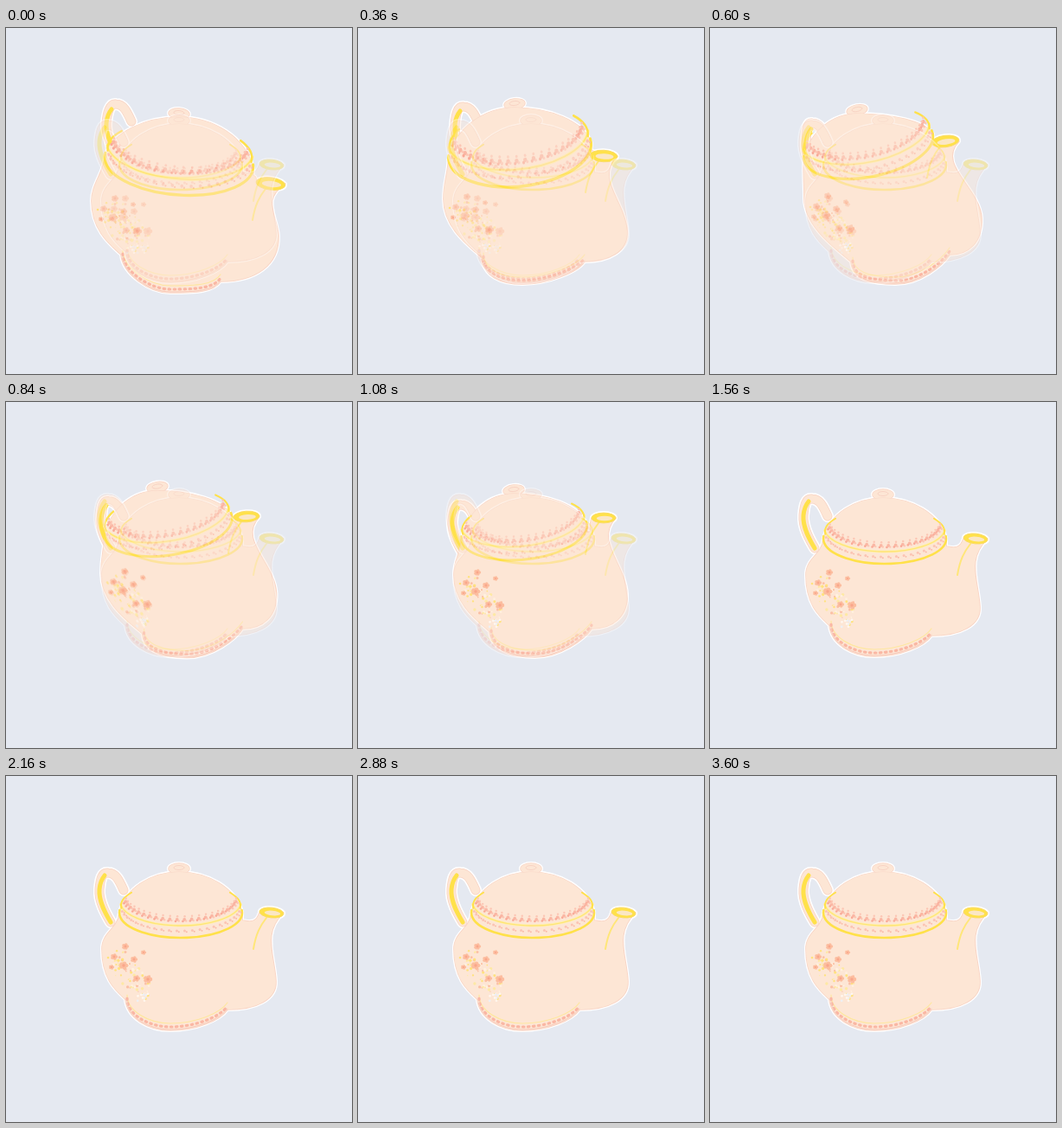
Animation of 400 by 400 pixels, one loop 3.72 s. Source, as an HTML page with a canvas:

```html
<!DOCTYPE html>
<html lang="en">
<head>
<meta charset="utf-8">
<title>Wobbling teapot</title>
<style>
html, body { margin: 0; width: 100%; height: 100%; overflow: hidden; background: #e5e9f1; }
canvas { position: absolute; left: 0; top: 0; }
#ghost { opacity: .4; }
</style>
</head>
<body>
<canvas id="pot" width="400" height="400"></canvas>
<canvas id="ghost" width="400" height="400"></canvas>
<script>
const FILL = '#fde6d5', EDGE = '#f8d3c4', YELLOW = '#ffe14a', PINK = '#fab7a4';
const STEP = 120, LOOP = 3720;

// rim x y rx ry turn | knob | handle top, left | mouth x y rx turn | body left | base left, bottom, right | bulge
const rest = [202,158,71,29,0, 200,105, 118,107, 103,131, 307,158,14,.1, 111,200, 138,258, 190,294, 256,270, 312,237];
const lean = [200,155,86,38,.08, 200,97, 127,83, 111,110, 306,180,17,.12, 99,200, 133,262, 190,306, 248,293, 315,240];
const rise = [187,142,83,41,-.12, 181,86, 122,86, 107,112, 284,148,16,.05, 99,198, 143,265, 190,296, 262,270, 311,235];
const back = [183,137,76,35,-.2, 170,93, 118,105, 106,133, 272,131,16,-.12, 109,197, 163,270, 214,296, 277,262, 314,220];
const fall = [192,150,73,32,-.12, 180,100, 119,114, 104,138, 284,134,14,0, 111,200, 152,265, 204,295, 270,262, 311,222];

const mix = (a, b, k) => a.map((v, i) => v + (b[i] - v) * k);
const keys = [[0, lean], [120, mix(rest, lean, 1.2)], [360, rise], [600, back], [1080, fall], [1440, rest]];

function poseAt(t) {
  const i = keys.findIndex(k => k[0] > t);
  if (i < 0) return rest;
  const [t0, a] = keys[i - 1], [t1, b] = keys[i];
  return mix(a, b, (t - t0) / (t1 - t0));
}

function seeded(seed) {
  return () => (seed = seed * 16807 % 2147483647) / 2147483647;
}

function draw(c, p) {
  const [rx, ry, rw, rh, turn, kx, ky, tx, ty, hx, hy, mx, my, mw, mturn,
    lx, ly, ax, ay, bx, by, ex, ey, ux, uy] = p;
  const dx = rw * Math.cos(turn), dy = rw * Math.sin(turn);
  const left = [rx - dx, ry - dy], right = [rx + dx, ry + dy];

  const stroke = (path, color, width) => {
    c.strokeStyle = color; c.lineWidth = width; c.stroke(path);
  };
  const fill = (path, color) => { c.fillStyle = color; c.fill(path); };
  const dot = (x, y, r, color) => {
    c.fillStyle = color; c.beginPath(); c.arc(x, y, r, 0, 7); c.fill();
  };
  const oval = (x, y, w, h, a = 0, from = 0, to = 2 * Math.PI) => {
    const path = new Path2D();
    path.ellipse(x, y, w, h, a, from, to);
    return path;
  };
  const baseCurve = (path, up) => {
    path.bezierCurveTo(ax + 2, ay + 22 - up, bx - 25, by - up, bx, by - up);
    path.bezierCurveTo(bx + 30, by - up, ex - 8, ey + 12 - up, ex, ey - up);
  };

  const handle = new Path2D();
  handle.moveTo(hx + 18, hy + 38);
  handle.bezierCurveTo(hx + 12, hy + 28, hx + 4, hy + 14, hx + 5, hy);
  const grip = new Path2D(handle);
  handle.bezierCurveTo(hx + 6, hy - 12, tx - 7, ty + 4, tx, ty + 5);
  handle.bezierCurveTo(tx + 9, ty + 5, tx + 13, ty + 14, tx + 18, ty + 25);
  grip.quadraticCurveTo(hx + 6, hy - 10, hx + 11, hy - 16);

  const body = new Path2D();
  body.moveTo(...left);
  body.bezierCurveTo(left[0] - 1, left[1] + 19, lx, ly - 20, lx, ly);
  body.bezierCurveTo(lx, ly + 34, ax - 12, ay - 11, ax, ay);
  baseCurve(body, 0);
  body.bezierCurveTo(ex + .6 * (ux - ex), ey, ux + 1, uy + .65 * (ey - uy), ux, uy);
  body.bezierCurveTo(ux - 2, uy - .4 * (uy - my), mx - 11, my + .3 * (uy - my), mx + mw, my);
  body.lineTo(mx - mw, my);
  body.bezierCurveTo(mx - mw - 4, my + 13, right[0] + 8, right[1] + 10, right[0], right[1] + 9);
  body.lineTo(...right);
  body.closePath();

  const lid = new Path2D(), top = ky + 6, lw = kx - left[0], rlen = right[0] - kx;
  lid.moveTo(...left);
  lid.bezierCurveTo(left[0] + .1 * lw, left[1] + .62 * (top - left[1]), kx - .45 * lw, top, kx, top);
  lid.bezierCurveTo(kx + .45 * rlen, top, right[0] - .1 * rlen, right[1] + .62 * (top - right[1]), ...right);
  lid.addPath(oval(rx, ry, rw, rh, turn, 0, Math.PI));

  const knob = oval(kx, ky + 2, 12, 6, turn);
  const mouth = oval(mx, my, mw, mw * .42, mturn);

  c.clearRect(0, 0, 400, 400);
  c.lineCap = c.lineJoin = 'round';
  stroke(handle, '#fff', 14);
  for (const part of [body, lid, knob, mouth]) stroke(part, '#fff', 4);
  stroke(handle, EDGE, 11);
  stroke(handle, FILL, 9.5);
  stroke(grip, YELLOW, 5);

  stroke(body, EDGE, 1.6);
  fill(body, FILL);
  stroke(knob, EDGE, 1.4);
  fill(knob, FILL);
  stroke(lid, EDGE, 1.2);
  fill(lid, FILL);
  stroke(oval(kx, ky + 1, 6, 2.5, turn), EDGE, 1);

  // foot border
  const foot = up => {
    const path = new Path2D();
    path.moveTo(ax + 2, ay - up + 3);
    baseCurve(path, up);
    return path;
  };
  stroke(foot(8), '#fee7a0', 1.2);
  c.setLineDash([1.5, 4.5]);
  stroke(foot(4), PINK, 3.2);
  c.setLineDash([]);
  stroke(foot(1), '#f9c9ba', 1);

  // rim and lid borders
  c.save();
  c.translate(rx, ry);
  c.rotate(turn);
  c.scale(rw / 71, rh / 29);
  stroke(oval(0, -13, 70, 28, 0, .12, Math.PI - .12), '#fff0b0', 3);
  stroke(oval(0, -13, 70, 28, 0, .12, Math.PI - .12), '#ffe477', 1.3);
  stroke(oval(0, 0, 71, 29, 0, -.1, Math.PI + .1), YELLOW, 2.6);
  stroke(oval(0, -8, 69, 27, 0, -.6, .1), YELLOW, 2);
  stroke(oval(0, -8, 69, 27, 0, Math.PI - .1, Math.PI + .6), YELLOW, 2);
  for (let i = 0; i < 22; i++) {
    const a = .2 + i * (Math.PI - .4) / 21, x = Math.cos(a), y = Math.sin(a);
    const px = 65 * x, py = 26 * y - 19;
    dot(px, py + 1, 1.9, PINK);
    dot(px - 1.8, py + 3, 1.3, '#f9a997');
    dot(px + 2, py + 2.6, 1.2, '#fcc6b4');
    dot(px + .4, py - 2.7, 1.2, '#fcc6b4');
    dot(69 * x, 28 * y - 7, 1.5, '#fbc4b3');
    dot(69 * x + 2.4, 28 * y - 5.7, .9, PINK);
  }
  c.restore();

  // spout
  const streak = new Path2D();
  streak.moveTo(mx - 6, my + 6);
  streak.bezierCurveTo(mx - 13, my + 15, mx - 18, my + 24, mx - 21, my + 42);
  stroke(streak, '#ffe679', 2);
  fill(mouth, YELLOW);
  stroke(mouth, '#fbdc65', 1);
  fill(oval(mx + 1, my + .5, mw * .66, mw * .2, mturn), '#fbe7c4');

  // flowers
  const rnd = seeded(73);
  c.save();
  c.translate(lx - 111, ly - 200);
  for (let i = 0; i < 85; i++) {
    const u = rnd(), x = 116 + u * 34 + rnd() * 20, y = 198 + u * 34 + rnd() * 26;
    dot(x, y, .6 + rnd() * 1.2, ['#ffe27e', '#fee9a5', '#fbc0a5', '#fff1df'][i % 4]);
  }
  for (const [x, y, r] of [[138, 197, 4], [125, 209, 4], [136, 219, 5], [148, 212, 4],
    [159, 204, 3], [164, 235, 5], [151, 234, 4], [122, 221, 3]]) {
    for (let a = 0; a < 5; a++)
      dot(x + Math.cos(a * 1.26) * r * .6, y + Math.sin(a * 1.26) * r * .5, r * .45, '#fcbd9f');
    dot(x, y, r * .35, '#f9a68b');
  }
  for (let i = 0; i < 9; i++)
    dot(152 + rnd() * 13, 251 + rnd() * 9, 1.4, i % 2 ? '#edf0f5' : '#fff6ee');
  c.restore();
}

const pot = document.getElementById('pot').getContext('2d');
draw(document.getElementById('ghost').getContext('2d'), rest);

const start = performance.now();
let shown = -1;
function tick() {
  const t = (performance.now() - start) % LOOP;
  const step = Math.floor(t / STEP);
  if (step !== shown) {
    shown = step;
    draw(pot, poseAt(step * STEP));
  }
  requestAnimationFrame(tick);
}
tick();
</script>
</body>
</html>
```
